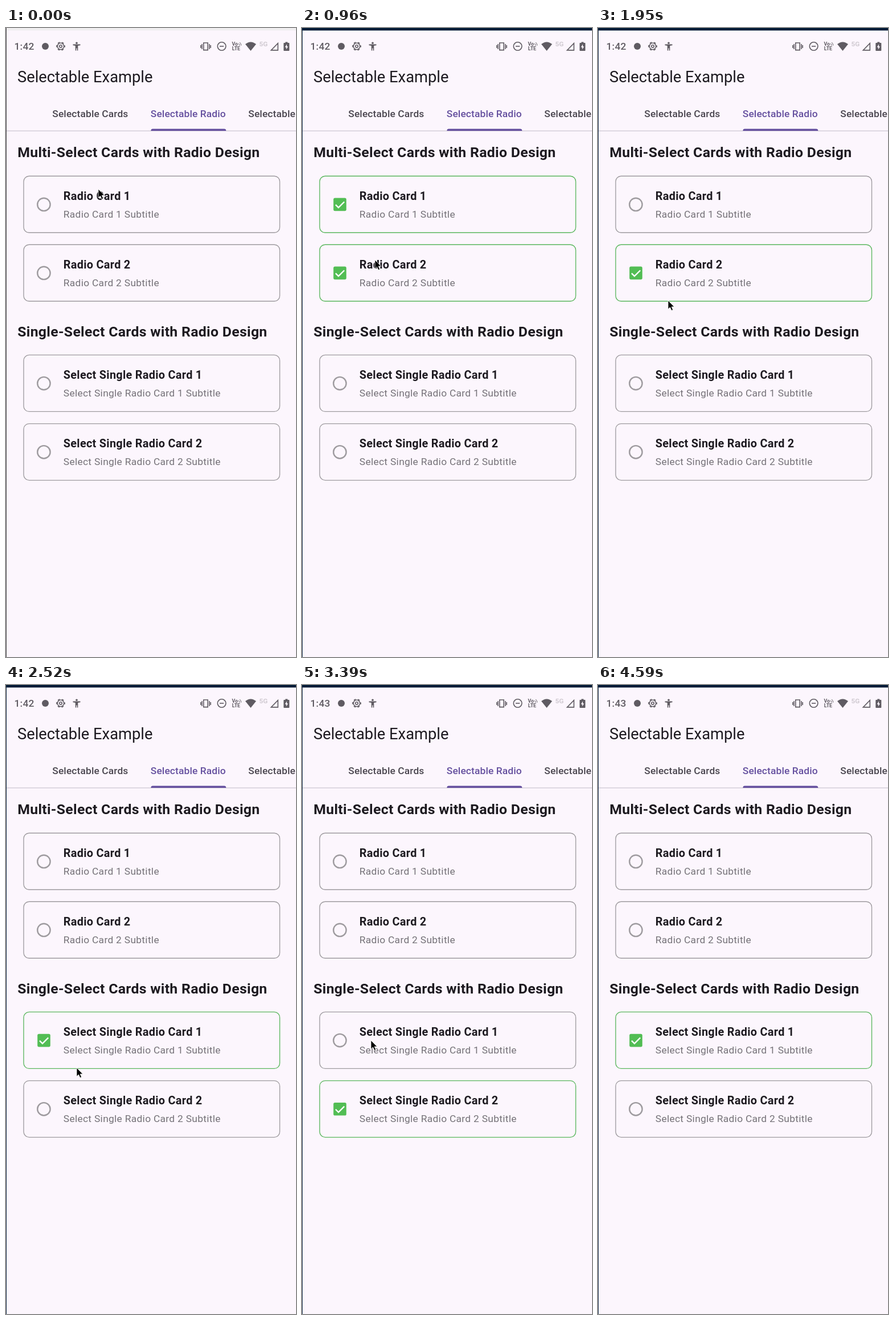
Write an HTML page that moves like this. It is 509 by 1101 pixels and loops after 4.68 s.

```html
<!DOCTYPE html>
<html lang="en">
<head>
<meta charset="utf-8">
<title>Selectable Example</title>
<style>
  @property --on { syntax: "<integer>"; inherits: true; initial-value: 0; }

  :root { --bg: #fcf6fd; --ink: #1d1a20; --status: #5f5b62; --loop: 4680ms; }
  html, body { margin: 0; width: 100%; height: 100%; overflow: hidden; background: var(--bg); }
  svg { display: block; width: 100vw; height: 100vh; }
  text { font-family: Roboto, sans-serif; fill: var(--ink); white-space: pre; }

  .title { font-size: 27.3px; }
  .tab { font-size: 17.36px; font-weight: 500; letter-spacing: .124px; fill: #4a464f; }
  .tab.active { fill: #65509f; }
  .heading { font-size: 24.8px; font-weight: 700; letter-spacing: .31px; }
  .name { font-size: 19.84px; font-weight: 700; letter-spacing: .31px; }
  .sub { font-size: 17.36px; letter-spacing: .31px; fill: #757278; }

  .status text { fill: var(--status); font-weight: 700; }
  .status .time { font-size: 17.4px; font-weight: 500; letter-spacing: .2px; }
  .status .line { fill: none; stroke: var(--status); stroke-width: 1.6; }
  .status .fill { fill: var(--status); }

  .off { fill: none; stroke: #9e9b9f; opacity: calc(1 - var(--on)); }
  .on { fill: none; stroke: #5bb75e; opacity: var(--on); }
  .frame { stroke-width: 1.35; }

  .card, .clock { animation: var(--loop) step-end infinite; }
  #multi1 { animation-name: multi1; }
  #multi2 { animation-name: multi2; }
  #single1 { animation-name: single1; }
  #single2 { animation-name: single2; }
  .clock { animation-name: clock; }
  .early { opacity: calc(1 - var(--on)); }
  .late { opacity: var(--on); }
  .edge { animation: edge var(--loop) step-end infinite; }
  .side { animation: side var(--loop) step-end infinite; }
  .cursor { animation: cursor var(--loop) ease-in-out infinite; }

  @keyframes multi1 { 0% { --on: 0 } 7.69% { --on: 1 } 30.77%, 100% { --on: 0 } }
  @keyframes multi2 { 0% { --on: 0 } 17.1% { --on: 1 } 44.2%, 100% { --on: 0 } }
  @keyframes single1 { 0% { --on: 0 } 50.64% { --on: 1 } 61.54% { --on: 0 } 73.72%, 100% { --on: 1 } }
  @keyframes single2 { 0% { --on: 0 } 61.54% { --on: 1 } 73.72%, 100% { --on: 0 } }
  @keyframes clock { 0% { --on: 0 } 65.4%, 100% { --on: 1 } }
  @keyframes edge { 0% { fill: #f0eef0 } .64%, 100% { fill: #001b36 } }
  @keyframes side { 0% { fill: #4a474c } .64%, 100% { fill: #0b2440 } }
  @keyframes cursor {
    0% { transform: translate(162px, 282px) }
    6.4%, 10.2% { transform: translate(140px, 296px) }
    15.4%, 21.8% { transform: translate(128px, 406px) }
    28.2%, 32% { transform: translate(126px, 308px) }
    39.7%, 41.8% { transform: translate(123px, 477px) }
    44.2%, 45.5% { transform: translate(123px, 462px) }
    50%, 51.3% { transform: translate(124px, 655px) }
    53.2%, 54.5% { transform: translate(124px, 670px) }
    60.3%, 64.1% { transform: translate(122px, 740px) }
    71.8%, 75% { transform: translate(121px, 622px); animation-timing-function: ease-in }
    83.97% { transform: translate(81px, 254px); animation-timing-function: linear }
    87.2%, 100% { transform: translate(72px, -24px) }
  }
</style>
</head>
<body>
<svg viewBox="0 0 509 1101" preserveAspectRatio="none">
  <rect width="509" height="1101" fill="#fcf6fd"/>
  <rect class="edge" width="509" height="4.4"/>
  <rect class="side" width="1" height="1101"/>

  <g class="status">
    <g class="clock">
      <text class="time early" x="14.5" y="38">1:42</text>
      <text class="time late" x="14.5" y="38">1:43</text>
    </g>
    <circle class="fill" cx="69" cy="32" r="6"/>
    <!-- settings gear -->
    <g class="line">
      <circle cx="96" cy="32" r="5.7"/>
      <circle cx="96" cy="32" r="7.1" stroke-dasharray="3.7 3.735" stroke-dashoffset="1.85"/>
      <circle cx="96" cy="32" r="2.2"/>
    </g>
    <!-- accessibility figure -->
    <circle class="fill" cx="124" cy="26.2" r="1.8"/>
    <path class="fill" d="M117.5 28.6h13v1.7l-4.2.7v8.6h-1.6v-4.2h-1.4v4.2h-1.6V31l-4.2-.7z"/>
    <!-- vibrate -->
    <path class="line" d="M346.8 26h7.4v12.6h-7.4zM344 28v9M357 28v9M341.8 30v5M359.2 30v5"/>
    <!-- do not disturb -->
    <circle class="line" cx="378.6" cy="32" r="7.3"/>
    <path class="line" d="M375 32h7.2"/>
    <text x="396.5" y="31" font-size="8.8">Vo</text>
    <path class="line" stroke-width="1" style="stroke-width:1" d="M408 27q2 1.5 1.8 4M410.3 25.2q2.6 2.5 2.3 5.5"/>
    <text x="396.8" y="39.2" font-size="8.8">LTE</text>
    <!-- wifi -->
    <path class="fill" d="M429.5 40L420 28.2Q429.5 20.6 439 28.2z"/>
    <g style="opacity:.35"><text style="fill:#7f7982" x="444.5" y="32.2" font-size="11.8">5G</text></g>
    <!-- signal -->
    <path class="line" d="M465.3 38.9h12V26.8z"/>
    <!-- battery -->
    <path class="fill" d="M490.3 24.4h4v1.6h2.2q.8 0 .8.8v12.4q0 .8-.8.8h-8.4q-.8 0-.8-.8V26.8q0-.8.8-.8h2.2z"/>
    <path d="M493 28.2l-3.4 5.6h2.2v4l3.3-5.6h-2.1z" fill="#fcf6fd"/>
  </g>

  <text class="title" x="20" y="95">Selectable Example</text>
  <text class="tab" x="81.3" y="156">Selectable Cards</text>
  <text class="tab active" x="253.8" y="156">Selectable Radio</text>
  <text class="tab" x="425.3" y="156">Selectable</text>
  <rect x="1" y="179.5" width="508" height="1.2" fill="#cbc5d0"/>
  <path d="M254.3 180v-.2q0-3.4 3.4-3.4h125.2q3.4 0 3.4 3.4v.2z" fill="#65509f"/>

  <text class="heading" x="20.2" y="226.3">Multi-Select Cards with Radio Design</text>
  <text class="heading" x="20.2" y="539.6">Single-Select Cards with Radio Design</text>
  <g id="cards"></g>

  <path class="cursor" d="M0 0V15.2L3.5 12 6 17.6 8.6 16.4 6.2 11H10.8z"
        fill="#000" stroke="#fff" stroke-width=".8" stroke-linejoin="round"/>
</svg>
<script>
  const card = (id, y, name) => {
    const frame = '<rect class="frame" x="31" y="0" width="449.5" height="99" rx="9.5"/>';
    return `<g id="${id}" class="card" transform="translate(0 ${y})">
      <g class="off">${frame}<circle cx="66.4" cy="49.7" r="11.2" stroke-width="2.4"/></g>
      <g class="on">${frame}
        <rect x="55.2" y="38.4" width="22.6" height="22.6" rx="2.6" fill="#52bd54" stroke="none"/>
        <path d="M59 50.2l5 5 10.2-10.2" stroke="#fff" stroke-width="2.3"/>
      </g>
      <text class="name" x="100.8" y="41.8">${name}</text>
      <text class="sub" x="100.8" y="72.6">${name} Subtitle</text>
    </g>`;
  };

  document.getElementById('cards').innerHTML =
    card('multi1', 259.2, 'Radio Card 1') +
    card('multi2', 379.2, 'Radio Card 2') +
    card('single1', 572.4, 'Select Single Radio Card 1') +
    card('single2', 692.6, 'Select Single Radio Card 2');
</script>
</body>
</html>
```
